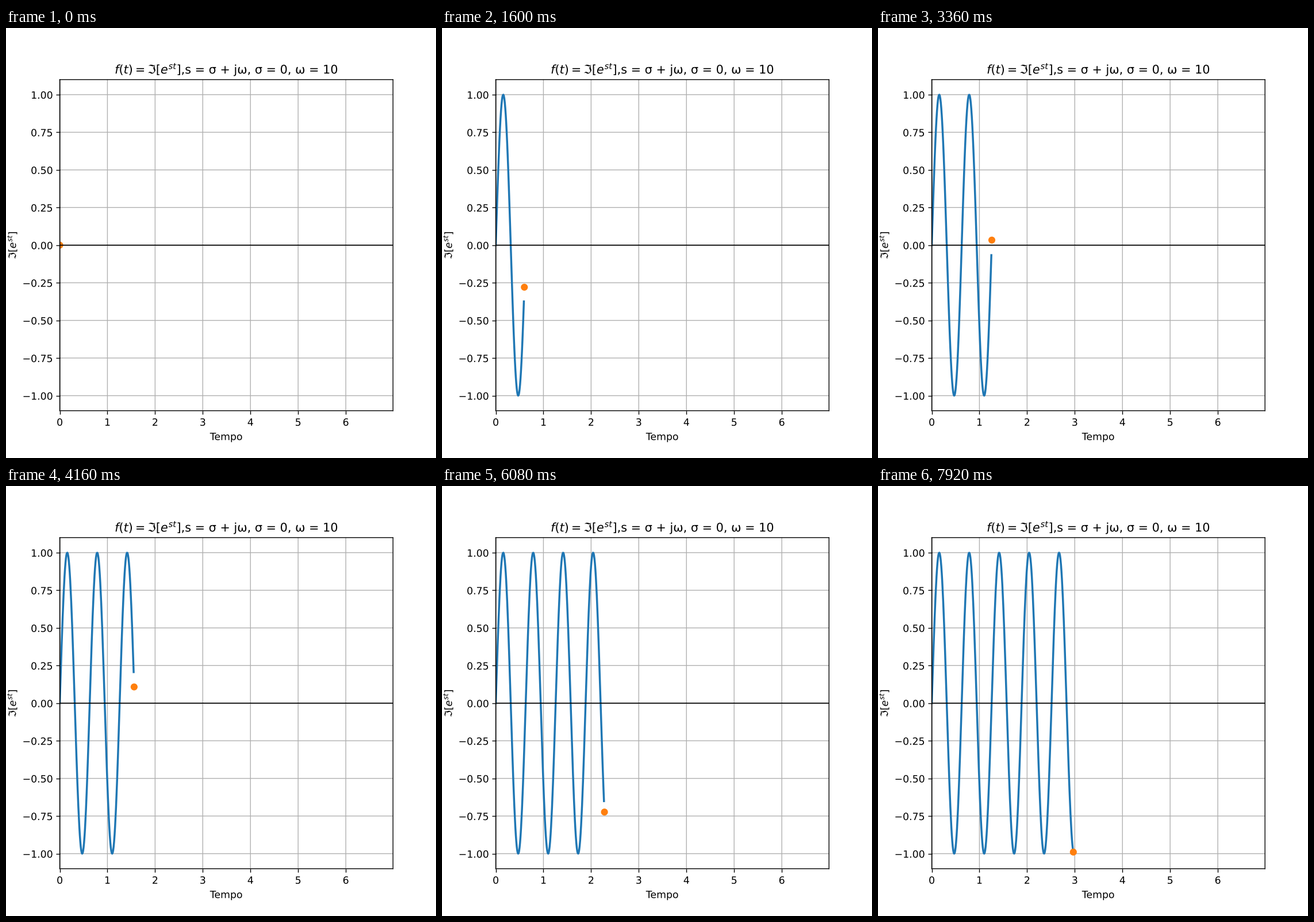
A matplotlib script for the animation above (8 s loop, 748 px wide and 748 px high).

```python
import matplotlib.pyplot as plt
import numpy as np
from matplotlib.animation import FuncAnimation
from matplotlib.patheffects import Normal

SIZE = 748
DPI = 124.6666666667
FRAMES, INTERVAL = 100, 80
STEP = 3  # samples advanced per frame
SIGMA, OMEGA = 0, 10

# Draw lines, markers and text at sub-pixel positions.
plt.rcParams["path.snap"] = False
plt.rcParams["path.effects"] = [Normal()]

t = np.arange(0, 7, 0.01)
y = np.exp((SIGMA + 1j * OMEGA) * t).imag

fig, ax = plt.subplots(figsize=(SIZE / DPI + 1e-9,) * 2, dpi=DPI)
curve, = ax.plot([], [], lw=2)
dot, = ax.plot([], [], "o")
ax.axhline(0, color="black", lw=1)
ax.axvline(0, color="black", lw=1)
ax.set_xlim(t[0], t[-1])
ax.set_ylim(-1.1, 1.1)
ax.grid(True)
ax.set_title(rf"$f(t) = \Im[e^{{st}}]$,s = σ + jω, σ = {SIGMA}, ω = {OMEGA}")
ax.set_xlabel("Tempo")
ax.set_ylabel(r"$\Im[e^{st}]$")


def update(frame):
    n = frame * STEP
    curve.set_data(t[:n], y[:n])
    dot.set_data([t[n]], [y[n]])
    return curve, dot


anim = FuncAnimation(fig, update, frames=FRAMES, interval=INTERVAL,
                     repeat=True, repeat_delay=0)
plt.show()
```
